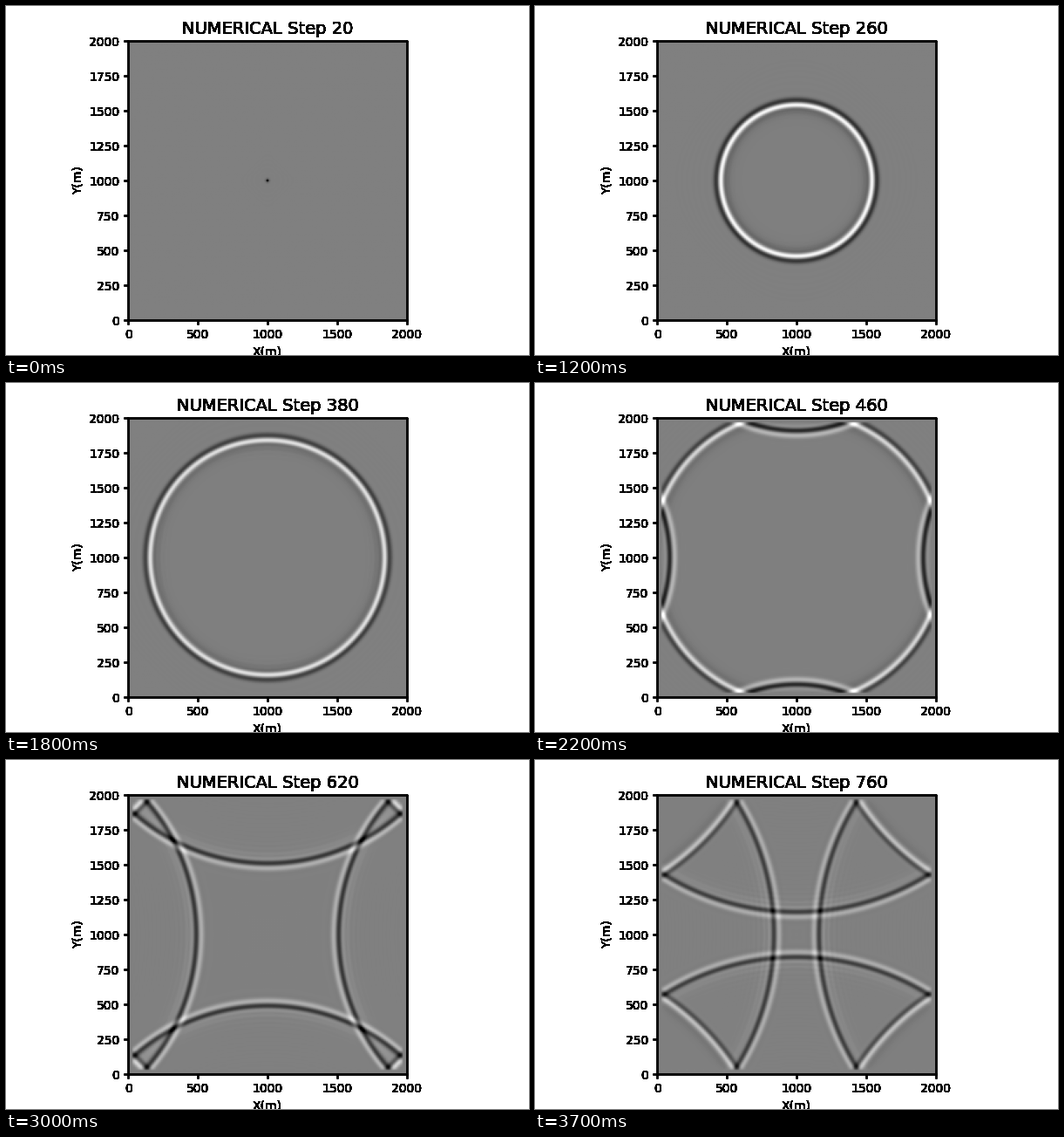
Recreate the animation shown at these times as a matplotlib script. Size 600x400 px, loop 3.8 s.

```python
import numpy as np
import matplotlib.pyplot as plt
from matplotlib.animation import FuncAnimation

SIZE, DX, DT, SPEED = 2000, 10, 0.001, 2500
FREQ, DELAY = 30, 0.04
FRAMES, STRIDE, INTERVAL = 38, 20, 100
OVERDRAW = 40


def ricker(t):
    a = (np.pi * FREQ * (t - DELAY)) ** 2
    return (1 - 2 * a) * np.exp(-a)


def laplacian(p):
    """Sixth-order stencil on the interior, in units of DX**2."""
    n = len(p)
    mid = slice(3, n - 3)
    out = 2 * (-49 / 18) * p[mid, mid]
    for k, w in enumerate((3 / 2, -3 / 20, 1 / 90), start=1):
        low, high = slice(3 - k, n - 3 - k), slice(3 + k, n - 3 + k)
        out += w * (p[low, mid] + p[high, mid] + p[mid, low] + p[mid, high])
    return out


def simulate():
    n = SIZE // DX + 1
    old, now = np.zeros((n, n)), np.zeros((n, n))
    courant2 = (SPEED * DT / DX) ** 2
    snapshots = []
    for step in range(1, FRAMES * STRIDE + 1):
        new = np.zeros((n, n))
        new[3:-3, 3:-3] = (2 * now - old)[3:-3, 3:-3] + courant2 * laplacian(now)
        new[n // 2, n // 2] += ricker(step * DT)
        old, now = now, new
        if step % STRIDE == 0:
            snapshots.append(now)
    return snapshots


def harden(artist):
    """Draw an artist repeatedly so that its soft edges turn solid."""
    draw_once = artist.draw

    def draw(renderer):
        for _ in range(OVERDRAW):
            draw_once(renderer)

    artist.draw = draw


plt.rcParams["font.family"] = "DejaVu Sans"
fields = simulate()
fig = plt.figure(figsize=(6, 4), dpi=100, facecolor="white")
ax = fig.add_axes([0.1, 0.1, 0.8, 0.8])
image = ax.imshow(fields[0], cmap="gray", vmin=-0.5, vmax=0.5,
                  origin="lower", extent=(0, SIZE, 0, SIZE))
ax.set(xticks=range(0, SIZE + 1, 500), yticks=range(0, SIZE + 1, 250),
       xlabel="X(m)", ylabel="Y(m)")
title = ax.set_title("", fontsize=14)

ticks = ax.xaxis.get_major_ticks() + ax.yaxis.get_major_ticks()
for tick in ticks:
    harden(tick.label1)
    harden(tick.tick1line)
for artist in (title, ax.xaxis.label, ax.yaxis.label, *ax.spines.values()):
    harden(artist)


def update(frame):
    image.set_data(fields[frame])
    title.set_text(f"NUMERICAL Step {(frame + 1) * STRIDE}")
    return [image, title]


animation = FuncAnimation(fig, update, frames=FRAMES, interval=INTERVAL,
                          repeat=True, repeat_delay=0, blit=False)
plt.show()
```
